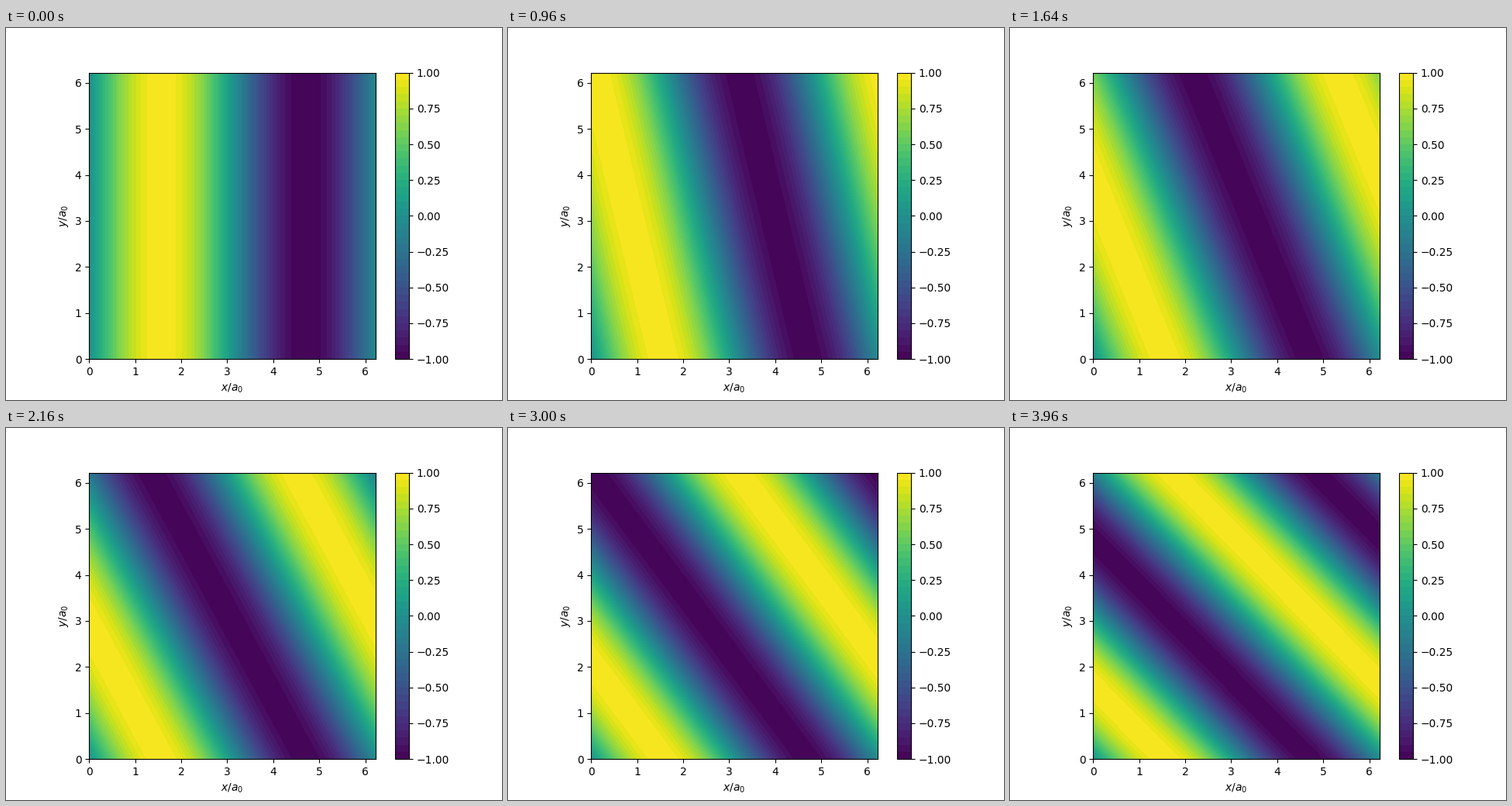
A matplotlib script for the animation above (4 s loop, 640 px wide and 480 px high).

```python
import numpy as np
import matplotlib.pyplot as plt
from matplotlib.animation import FuncAnimation

FRAMES = 100
LEVELS = np.linspace(-1, 1, 41)

axis = np.linspace(0, 2 * np.pi, 100, endpoint=False)
X, Y = np.meshgrid(axis, axis)

fig, ax = plt.subplots(figsize=(6.4, 4.8), dpi=100)
ax.set_aspect("equal")
ax.set_xlabel("$x/a_0$")
ax.set_ylabel("$y/a_0$")


def wave(slope):
    z = np.clip(np.sin(X + slope * Y), -1, 1)
    return ax.contourf(X, Y, z, levels=LEVELS, cmap="viridis")


bands = wave(0)
fig.colorbar(bands, ax=ax, ticks=np.linspace(-1, 1, 9))


def update(i):
    global bands
    bands.remove()
    bands = wave(i / FRAMES)
    return [bands]


anim = FuncAnimation(fig, update, frames=FRAMES, interval=40,
                     init_func=lambda: [], repeat=True, repeat_delay=0)
plt.show()
```
